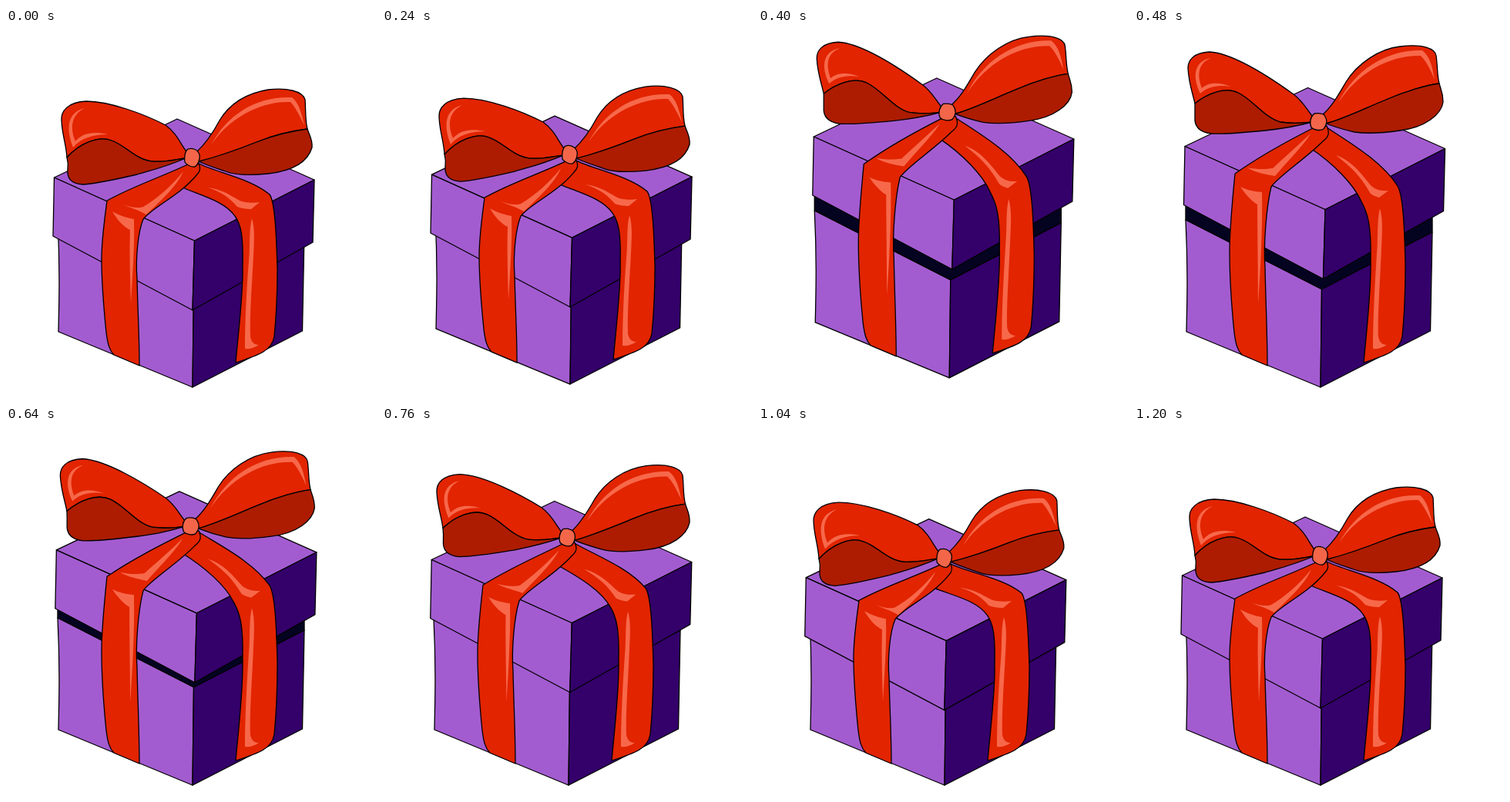
Write an HTML page with a canvas that moves like this. It is 480 px wide and 480 px high and loops after 1.24 s.

```html
<!DOCTYPE html>
<html lang="en">
<head>
<meta charset="utf-8">
<title>Gift box</title>
<style>
  html, body { margin: 0; width: 100%; height: 100%; overflow: hidden; background: #fff; }
  canvas { display: block; width: 480px; height: 480px; }
</style>
</head>
<body>
<canvas width="480" height="480"></canvas>
<script>
const ctx = document.querySelector('canvas').getContext('2d');
const LOOP = 1240, STEP = 40;
const PURPLE = '#a35cd0', DEEP = '#34006a', INSIDE = '#040421';
const RED = '#e22400', SHADE = '#ad1c00', SHINE = '#f7684a', CORAL = '#f4664a';

// [time, value] keys: height of the hop, and how far the lid is lifted off the box
const HOP = [[0, 0], [120, .01], [200, .06], [240, .18], [280, .55], [320, 1],
  [360, .95], [400, .55], [440, .12], [480, 0], [LOOP, 0]];
const LIFT = [[0, 0], [240, 0], [280, .33], [320, .83], [360, 1], [440, 1.02], [480, 1], [560, .95],
  [640, .82], [760, .506], [840, .2], [920, -.165], [960, -.19], [1000, -.13], [1080, 0],
  [1120, .02], [1200, 0], [LOOP, 0]];

// Static shapes: colour, path
const BOX = [
  [INSIDE, 'M67 222L244 300L387 232V265L244 339L67 249Z'],
  [PURPLE, 'M67 249L243.5 339L242 466L68 394C69 350 70 310 67 249Z'],
  [DEEP, 'M243.5 339L387 265L384.5 393L242 466Z'],
];
const LID = [
  [PURPLE, 'M222 118L62.5 194L244.5 276L400 197Z'],
  [PURPLE, 'M62.5 194L244.5 276L242 366L61 270Z'],
  [DEEP, 'M244.5 276L400 197L398 278L242 366Z'],
];

// Bending shapes: colour, path with the lid closed, path with the lid lifted
const RIGHT_STRAP = [
  [RED,
    'M232 206L250 176C275 188 319 196 342 216C350 227 351 285 352 312C352 340 350 380 348 400C345 418 330 424 298 434C302 390 308 340 307 310C308 270 305 255 297 244C284 225 255 218 229 207Z',
    'M232 157L250 129C277 147 321 172 342 205C350 219 351 270 352 305C352 340 350 380 348 400C345 418 330 424 298 434C302 390 308 340 307 300C308 255 303 240 295 225C285 203 259 176 229 156Z'],
  [SHINE,
    'M262 207C285 210 297 222 306 225C314 227 321 227 329 226L318 235C312 235 305 234 300 232C290 220 280 213 262 207Z',
    'M262 165C285 173 299 195 308 205C314 210 321 212 330 211L318 220C314 219 310 217 307 215C295 194 284 182 262 165Z'],
  [SHINE,
    'M319 247C323 260 322 275 321 295C319 335 316 370 317 401C319 409 323 411 328 411C322 415 316 417 310 416C310 380 312 340 315 302C317 280 315 262 319 247Z',
    'M319 234C323 248 322 265 321 285C319 335 316 370 317 401C319 409 323 411 328 411C322 415 316 417 310 416C310 380 312 340 315 292C317 270 315 250 319 234Z'],
];
const LEFT_STRAP = [
  [RED,
    'M238 176C200 194 165 205 131 224C127 255 124 275 124 300C124 330 127 365 130 395C132 410 134 418 140 424L173 438C173 400 171 370 170 325C168 300 171 265 178 248C190 232 225 218 247 191C252 186 253 182 250 176Z',
    'M236 128C200 146 165 165 131 189C128 220 124 262 124 290C124 330 127 365 130 395C132 410 134 418 140 424L173 438C173 400 171 360 170 310C168 285 171 235 178 206C188 192 222 170 245 147C253 141 254 136 250 127Z'],
  [SHINE,
    'M152 229C162 233 172 234 178 232C195 222 215 205 230 186C222 205 200 225 182 242C172 236 160 233 152 229Z',
    'M147 181C160 184 172 183 180 182C195 168 212 153 229 137C222 150 200 172 183 192C172 190 158 188 147 181Z'],
  [SHINE,
    'M138 238C148 244 157 246 166 248C167 285 164 320 162 358C161 320 160 290 161 262C151 257 144 248 138 238Z',
    'M138 206C148 211 157 212 166 213C167 260 164 315 161 358C161 310 160 260 160 229C151 223 144 215 138 206Z'],
];
const LEFT_WING = [
  [RED,
    'M234 160C226 150 222 137 207 126C180 112 135 95 104 95C80 96 71 108 72 120C73 140 78 150 79 168C95 150 120 139 137 146C155 152 168 171 190 173C210 174 222 170 233 169Z',
    'M231 114C223 104 219 95 207 86C182 68 130 33 98 31C77 32 70 42 70 52C71 72 76 84 79 98C95 85 118 76 135 84C154 93 170 117 190 122C207 125 220 123 231 122Z'],
  [SHADE,
    'M79 168C95 150 120 139 137 146C155 152 168 171 190 173C210 174 222 170 233 169C205 181 190 184 170 190C140 197 115 202 100 203C84 202 79 195 80 183C81 175 80 172 79 168Z',
    'M79 98C95 85 118 76 135 84C154 93 170 117 190 122C207 125 220 123 231 122C205 129 190 131 170 133C140 136 115 138 100 137C84 135 78 127 79 115C79 108 79 104 79 98Z'],
  [SHINE,
    'M102 104C82 109 76 126 87 155C97 143 113 138 132 138C113 134 100 136 90 147C83 130 84 113 102 104Z',
    'M100 39C80 42 74 60 86 85C95 76 110 73 126 76C110 70 97 70 88 78C82 62 82 46 100 39Z'],
];
const RIGHT_WING = [
  [RED,
    'M247 161C259 150 269 135 277 120C289 100 310 85 340 80C365 77 385 82 388 93C389 105 388 120 391 131C375 133 350 138 325 148C300 158 270 168 251 174Z',
    'M244 113C257 102 265 87 275 70C290 46 318 27 345 24C375 20 391 27 392 36C394 50 393 60 396 72C380 74 352 82 327 93C300 104 272 118 249 124Z'],
  [SHADE,
    'M250 173C270 168 300 158 325 148C350 138 375 133 391 131C394 140 398 145 397 155C392 172 375 185 340 189C310 192 295 190 285 186C270 181 260 178 250 173Z',
    'M249 124C272 118 300 104 327 93C352 82 380 74 396 72C398 80 401 84 401 96C399 112 378 129 345 133C318 137 300 137 286 135C272 132 260 128 249 124Z'],
  [SHINE,
    'M266 152C287 112 325 88 371 90C379 96 383 108 387 126C380 112 375 102 369 96C330 94 288 118 266 152Z',
    'M265 97C286 56 325 28 374 29C384 37 387 50 390 67C384 52 378 42 372 36C330 35 290 59 265 97Z'],
];
const KNOT = [
  [CORAL,
    'M236 157C242 155 248 158 250 162C253 167 250 177 245 180C240 181 234 177 232 174C231 168 232 160 236 157Z',
    'M234 111C239 110 245 111 247 113C251 119 251 125 246 131C241 134 233 132 230 129C227 123 229 115 234 111Z'],
];
const RIBBON = [...RIGHT_STRAP, ...LEFT_STRAP, ...LEFT_WING, ...RIGHT_WING, ...KNOT];

function valueAt(keys, t) {
  const i = keys.findIndex(key => key[0] > t);
  const [t0, v0] = keys[i - 1], [t1, v1] = keys[i];
  return v0 + (v1 - v0) * (t - t0) / (t1 - t0);
}

function mixPaths(a, b, k) {
  const ends = b.match(/\d+/g);
  let i = 0;
  return a.replace(/\d+/g, n => +n + (ends[i++] - n) * k);
}

function paint(color, d) {
  const path = new Path2D(d);
  ctx.fillStyle = color;
  ctx.fill(path);
  if (color !== SHINE) ctx.stroke(path);
}

function draw(t) {
  const hop = valueAt(HOP, t), lift = valueAt(LIFT, t);
  ctx.fillStyle = '#fff';
  ctx.fillRect(0, 0, 480, 480);
  ctx.lineWidth = 1.3;
  ctx.lineJoin = 'round';
  ctx.strokeStyle = '#000';
  ctx.save();
  ctx.translate(11.4 * hop, -22 * hop);
  for (const [color, d] of BOX) paint(color, d);
  ctx.save();
  ctx.translate(3.5 * lift, -40.5 * lift);
  for (const [color, d] of LID) paint(color, d);
  ctx.restore();
  for (const [color, closed, lifted] of RIBBON) paint(color, mixPaths(closed, lifted, lift));
  ctx.restore();
}

const start = performance.now();
function tick() {
  const t = (performance.now() - start) % LOOP;
  draw(Math.floor(t / STEP) * STEP);
  requestAnimationFrame(tick);
}
tick();
</script>
</body>
</html>
```
